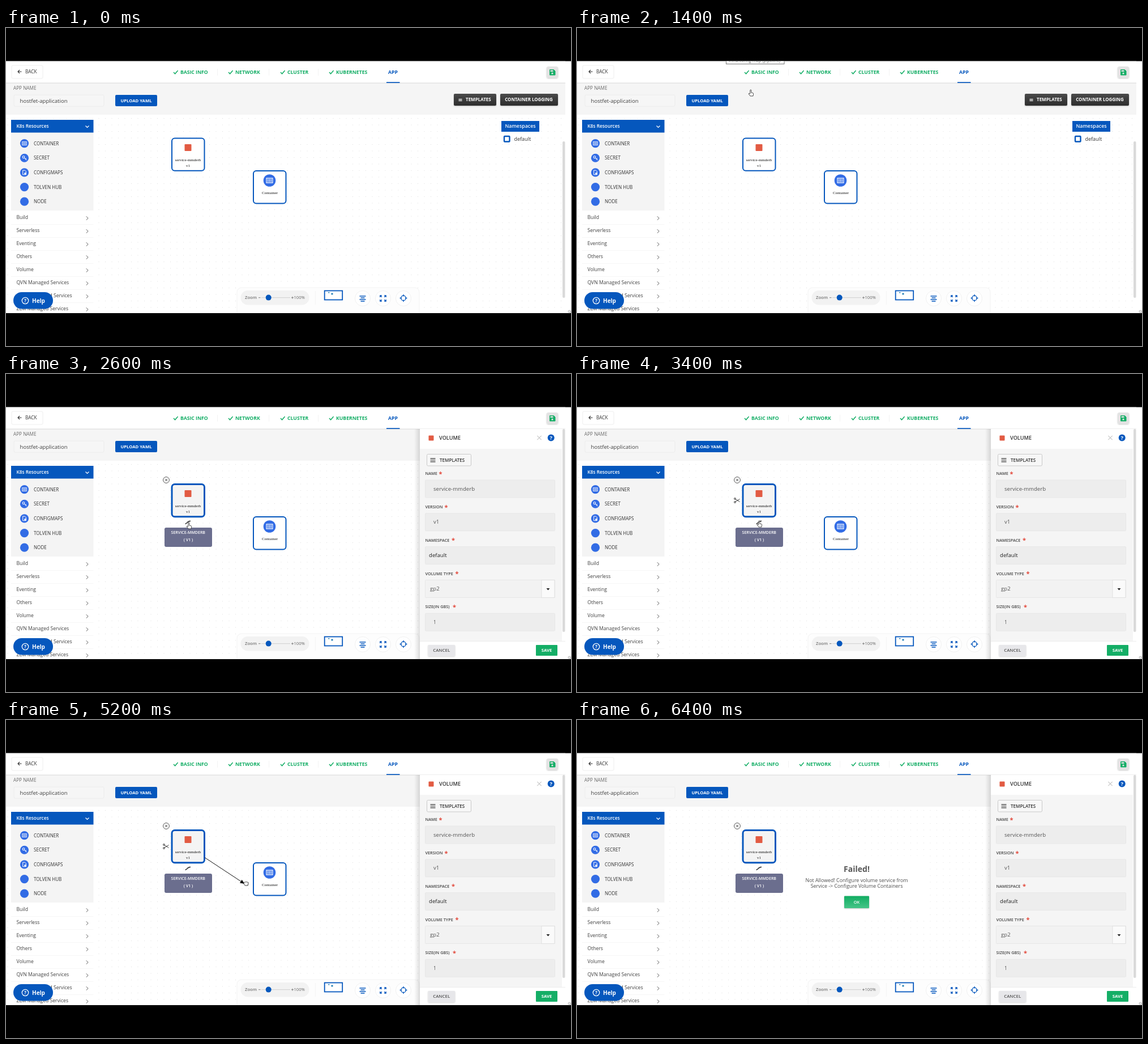
An HTML page for the animation above (6600 ms loop, 998 by 561 pixels).

```html
<!DOCTYPE html>
<html lang="en">
<head>
<meta charset="utf-8">
<title>App designer</title>
<style>
html, body { margin: 0; width: 100%; height: 100%; overflow: hidden; background: #000; }
svg { display: block; }
text { font-family: "Open Sans", "Noto Sans", sans-serif; white-space: pre; }
.serif { font-family: "Liberation Serif", serif; }
</style>
</head>
<body>
<svg id="stage" width="998" height="561" viewBox="0 0 998 561">
  <defs>
    <pattern id="dots" x="2.5" y="159" width="11.5" height="11.5" patternUnits="userSpaceOnUse">
      <rect width="1" height="1" fill="#dcdcdc"/>
    </pattern>
    <linearGradient id="dark" x2="0" y2="1"><stop stop-color="#4a4a4a"/><stop offset="1" stop-color="#2d2d2d"/></linearGradient>
    <linearGradient id="go" x2="0" y2="1"><stop stop-color="#12ad62"/><stop offset="1" stop-color="#45c487"/></linearGradient>
    <linearGradient id="shade"><stop stop-opacity="0"/><stop offset="1" stop-opacity=".13"/></linearGradient>
    <filter id="soft" x="-20%" y="-20%" width="140%" height="150%">
      <feDropShadow dx="0" dy="1" stdDeviation="1.3" flood-opacity=".22"/>
    </filter>
    <clipPath id="view"><rect y="58.5" width="998" height="444.5"/></clipPath>
  </defs>
  <g clip-path="url(#view)">
    <g id="page"></g>
    <g id="tip"></g>
    <g id="node"></g>
    <g id="picked"></g>
    <g id="scissors"></g>
    <g id="edge"><path id="line" stroke="#111" stroke-width="1"/><path id="head" fill="#111"/></g>
    <g id="panel"></g>
    <g id="dialog"></g>
    <g id="cursor"></g>
  </g>
</svg>
<script>
const BLUE = '#0557bd', GREEN = '#14ae66', INK = '#414141', RED = '#e25b43', KUBE = '#326ce5';
const $ = id => document.getElementById(id);

const rect = (x, y, w, h, fill, r = 0, extra = '') =>
  `<rect x="${x}" y="${y}" width="${w}" height="${h}" rx="${r}" fill="${fill}" ${extra}/>`;
const circle = (x, y, r, fill, extra = '') =>
  `<circle cx="${x}" cy="${y}" r="${r}" fill="${fill}" ${extra}/>`;
const path = (d, color = INK, w = 1, fill = 'none') =>
  `<path d="${d}" stroke="${color}" stroke-width="${w}" fill="${fill}"/>`;
const text = (x, y, s, size = 8, fill = INK, weight = 400, extra = '') =>
  `<text x="${x}" y="${y}" font-size="${size}" fill="${fill}" font-weight="${weight}" ${extra}>${s}</text>`;
const mid = (x, y, s, size, fill, weight, extra = '') =>
  text(x, y, s, size, fill, weight, 'text-anchor="middle" ' + extra);
const at = (x, y, s, k = 1) => `<g transform="translate(${x} ${y}) scale(${k})">${s}</g>`;
const bars = (x, y, w, gap, color, sw) =>
  path([-gap, 0, gap].map(d => `M${x} ${y + d}h${w}`).join(''), color, sw);
const cross = (x, y, r, color, w) =>
  path(`M${x - r} ${y - r}l${2 * r} ${2 * r}m0 ${-2 * r}l${-2 * r} ${2 * r}`, color, w);

const glyphs = {
  box: rect(-4, -3, 8, 6, 'none', 0, 'stroke="#fff" stroke-width=".9"') + path('M-2-2v4M0-2v4M2-2v4', '#fff', .9),
  key: circle(-1.6, -1.6, 2, 'none', 'stroke="#fff" stroke-width="1.1"') + path('M0 0l4 4M2 2l1.5-1.5', '#fff', 1.1),
  file: path('M-3-4h4l2 2v6h-6z', '#fff', 1) + circle(1.6, 2, 2, '#fff'),
  plain: ''
};
const badge = (x, y, glyph, k = 1) => at(x, y, circle(0, 0, 8, KUBE) + glyphs[glyph], k);

function topBar() {
  let s = rect(0, 58, 998, 445, '#fff') + rect(0, 58, 988, 2, '#eee');
  s += rect(0, 97, 988, 56, '#f5f5f5') + rect(0, 96.5, 988, 1.2, '#dedede');
  s += rect(10, 66, 55, 23, '#fff', 2, 'stroke="#eee" stroke-width="1"');
  s += path('M27.5 77h-6.5m3-3l-3 3l3 3', '#333', 1.1) + text(34, 80, 'BACK', 8.3, '#333');
  [[296, 'BASIC INFO'], [393, 'NETWORK'], [485, 'CLUSTER'], [571, 'KUBERNETES']].forEach(([x, name]) => {
    s += path(`M${x} 78l2.6 2.8l5-5.8`, GREEN, 1.5) + text(x + 12, 81, name, 8.7, GREEN, 700);
  });
  s += [373, 464, 551].map(x => rect(x, 72, 1, 12, '#f3f3f3')).join('');
  s += text(675, 80.5, 'APP', 8.7, BLUE, 700) + rect(672, 95.3, 23.5, 1.7, BLUE);
  s += rect(955, 68, 20, 20, '#e3e3e3', 3, 'filter="url(#soft)"');
  s += path('M960.5 73.5h7l2.5 2.5v7h-9.5z', GREEN, 1, GREEN) + rect(961.5, 74.5, 5, 2.4, '#e3e3e3') + circle(965, 80, 1.6, '#e3e3e3');

  s += text(13, 109, 'APP NAME', 8.2, '#6b6b6b');
  s += rect(14, 118, 159, 20, '#f6f6f6', 2, 'stroke="#ececec" stroke-width="1"') + text(24.5, 131.5, 'hostfet-application', 9.6);
  s += rect(193, 118, 74, 20, BLUE, 2) + mid(230, 130.7, 'UPLOAD YAML', 7.7, '#fff', 700);
  s += rect(791, 116, 75, 21, 'url(#dark)', 2, 'filter="url(#soft)"') + bars(799.5, 127, 6, 1.6, '#fff', .9);
  s += text(812, 129.3, 'TEMPLATES', 8, '#fff', 700);
  s += rect(873, 116, 102, 21, 'url(#dark)', 2, 'filter="url(#soft)"') + mid(923.5, 129.3, 'CONTAINER LOGGING', 7.9, '#fff', 700);
  return s;
}

function sideBar() {
  let s = rect(0, 154, 983, 349, 'url(#dots)') + rect(9, 162, 145.5, 341, '#fff') + rect(9, 184, 145.5, 138, '#f4f4f4');
  s += rect(9, 162, 145.5, 22.5, BLUE) + text(18.5, 176.3, 'K8s Resources', 8.3, '#fff', 600);
  s += path('M140.5 172.5l3 3l3-3', '#fff', 1.2);
  [['box', 'CONTAINER'], ['key', 'SECRET'], ['file', 'CONFIGMAPS'], ['plain', 'TOLVEN HUB'], ['plain', 'NODE']].forEach(([icon, name], i) => {
    const y = 203.6 + i * 25.65;
    s += badge(32.5, y, icon, .95) + text(49, y + 3, name, 8.1, '#333');
  });
  ['Build', 'Serverless', 'Eventing', 'Others', 'Volume', 'QVN Managed Services', '', 'ZLM Managed Services'].forEach((name, i) => {
    const y = 334.5 + i * 23;
    s += rect(9, y + 11.5, 145.5, .6, '#f1f1f1') + text(18.5, y + 2.9, name, 8.6) + path(`M141.8 ${y - 2.2}l3.2 3.2l-3.2 3.2`, '#555', 1);
  });
  s += text(116.5, 475.4, 'Managed Services', 8.6, INK, 400, 'text-anchor="end"');
  s += rect(13, 466, 70, 29.5, BLUE, 14.7) + circle(34, 481, 5.7, 'none', 'stroke="#fff" stroke-width="1.3"');
  s += mid(34, 484, '?', 8.5, '#fff', 700) + text(46, 484.5, 'Help', 10, '#fff', 700);
  return s;
}

function canvasArea() {
  let s = rect(875, 164, 67, 19, BLUE) + mid(908.5, 176.4, 'Namespaces', 8.8, '#fff', 600);
  s += rect(880, 191, 9.5, 9.5, '#fff', 1, `stroke="${BLUE}" stroke-width="2.4"`) + text(897.5, 198.6, 'default', 9, '#333');
  s += rect(983, 200, 4.5, 276, '#dadada', 2);
  s += rect(437, 252, 57.5, 57.5, '#fff', 5, `stroke="${BLUE}" stroke-width="2"`);
  s += badge(465.5, 269, 'box', 1.35) + mid(466, 293, 'Container', 7.1, '#111', 400, 'class="serif"');

  s += rect(408, 458, 322, 60, '#fdfdfd', 8, 'stroke="#f3f3f3" stroke-width="1"');
  s += rect(414.5, 463, 121, 25.5, '#f2f2f2', 12.5) + text(422, 478.3, 'Zoom', 7.7, '#777', 600);
  s += path('M446 475.7h3.5M504 475.7h4M506 473.7v4', '#777', .9) + rect(451, 475.2, 51, 1, '#cfcfcf');
  s += circle(463.7, 475.6, 5, BLUE) + text(508.5, 478.3, '100%', 7.6, '#666');
  s += rect(546, 464, .7, 24, '#efefef') + rect(562.7, 463.5, 31.5, 16, '#fff', 0, `stroke="${BLUE}" stroke-width="1.8"`);
  s += rect(569, 466, 2.5, 1.5, '#2b83b8') + rect(574.5, 467.5, 3, 3, '#2b83b8');
  s += [630, 666, 702].map(x => circle(x, 477, 13.5, '#fff', 'stroke="#f1f1f1" stroke-width="1"')).join('');
  s += path('M624.5 473h11M626.5 476h7M624.5 479h11M626.5 482h7', BLUE, 1.3);
  s += [0, 90, 180, 270].map(a => `<g transform="rotate(${a} 666 477)">${path('M663.8 474.8l-3-3m0 3.2v-3.2h3.2', BLUE, 1.3)}</g>`).join('');
  s += circle(702, 476.5, 4.3, 'none', `stroke="${BLUE}" stroke-width="1.3"`) + path('M702 470v3.5m0 6v3.5m-6.5-6.5h3.5m6 0h3.5', BLUE, 1.3);
  s += circle(995, 500, 1.9, 'none', 'stroke="#999" stroke-width=".8"') + path('M996.3 501.3l2 2', '#999', .8);
  return s;
}

const nodeBox = chosen =>
  rect(293, 194.5, 57.5, 57.2, chosen ? '#f4f4f4' : '#fff', 5, `stroke="${BLUE}" stroke-width="${chosen ? 3 : 2}"`) +
  rect(315.5, 205, 12, 12, RED, 1) +
  mid(321.5, 235.3, 'service-mmderb', 7, '#111', 400, 'class="serif"') + mid(321.5, 244.5, 'v1', 7, '#111', 400, 'class="serif"');

function pickedParts() {
  return circle(283, 187, 5.4, '#fff', 'stroke="#555" stroke-width="1"') + cross(283, 187, 2.1, '#555', 1) +
    path('M316.5 264.3c4 0 3-5 9.5-5', '#444', 1.7) +
    rect(280, 271, 84, 34, '#6b6e8e', 3) +
    mid(321.8, 281.8, 'SERVICE-MMDERB', 7, '#fff', 600) + mid(322, 295, '( V1 )', 7, '#fff', 600);
}

function panelParts() {
  let s = rect(721, 97, 10, 406, 'url(#shade)') + rect(731, 97, 257, 406, '#fff') + rect(731, 132, 251, 340, '#f5f5f5');
  s += rect(983, 97, 4.5, 358, '#dadada', 2);
  s += rect(746.5, 108.5, 9, 9, RED, 1) + text(765, 115.7, 'VOLUME', 9.2, '#333', 600);
  s += cross(942, 112.5, 3.7, '#c6c6c6', 1.1) + circle(962.7, 112.5, 6, BLUE) + mid(962.7, 116, '?', 9.5, '#fff', 700);
  s += rect(743.5, 141.5, 78, 20.5, '#f7f7f7', 2, 'stroke="#c9c9c9" stroke-width="1"') + bars(749.5, 152, 9, 2.8, '#333', 1.2);
  s += text(766, 154.8, 'TEMPLATES', 8.1, '#333', 600);
  const fields = [
    ['NAME', 'service-mmderb', 755, 767.5], ['VERSION', 'v1', 755, 777.5], ['NAMESPACE', 'default', 747, 790],
    ['VOLUME TYPE', 'gp2', 749, 796.5], ['SIZE(IN GBS)', '1', 755, 792]
  ];
  fields.forEach(([label, value, x, star], i) => {
    const y = 187 + i * 58.8, pick = i === 3;
    s += text(740.5, y - 8.8, label, 7.3, '#444', 600) + mid(star, y - 7.2, '*', 11, '#e3493c', 700);
    s += rect(740.5, y, 229, 31, pick ? '#f2f2f2' : '#ededed', 1, 'stroke="#e5e5e5" stroke-width=".8"');
    s += text(x, y + 18.6, value, i === 4 ? 8.5 : 9.6, i === 2 ? '#222' : '#555');
  });
  s += rect(946, 363.5, 23, 31, '#fafafa', 0, 'stroke="#dcdcdc" stroke-width=".8"') + path('M954.5 378h6l-3 3.4z', '#222', 0, '#222');
  s += rect(731, 471.5, 257, 32, '#fff') + rect(731, 471, 257, .8, '#e9e9e9');
  s += rect(745.5, 478, 47.5, 19.5, '#e7e7ea', 1, 'filter="url(#soft)"') + mid(769.2, 490, 'CANCEL', 7.9, '#555', 600);
  s += rect(936, 478, 38, 19, GREEN, 1) + mid(955, 490, 'SAVE', 7.7, '#fff', 700);
  return s;
}

function dialogParts() {
  return rect(371, 240, 246, 105, '#fff', 2) + mid(494, 268.3, 'Failed!', 14, '#575757', 700) +
    mid(494, 285.6, 'Not Allowed! Configure volume service from', 8.85, '#4d4d4d') +
    mid(494, 295.9, 'Service -&gt; Configure Volume Containers', 8.85, '#4d4d4d') +
    rect(472, 310.5, 44, 21.5, 'url(#go)', 1, 'filter="url(#soft)"') + mid(494, 323.5, 'OK', 7.3, '#fff', 600);
}

const pointers = {
  hand: path('M-1.2 1v-6q0-1 1-1t1 1v4l3 .7q1 .3.8 1.5l-.6 3.8h-5l-3-4q.3-1.4 1.8-.2z', '#222', .8, '#fff'),
  grab: path('M-3.5-1q1-2 2-.8q1-1.4 2.2-.2q1.4-1 2 .3q1.6-.3 1.3 1.5l-.8 4.2h-5l-2.2-3z', '#222', .9, '#fff'),
  move: path('M-4 0h8M0-4v8', '#fff', 2.8) + path('M-4 0h8M0-4v8M-1.4-3.2l1.4-1.6l1.4 1.6M-1.4 3.2l1.4 1.6l1.4-1.6M-3.2-1.4l-1.6 1.4l1.6 1.4M3.2-1.4l1.6 1.4l-1.6 1.4', '#222', .8)
};

$('page').innerHTML = topBar() + sideBar() + canvasArea();
$('tip').innerHTML = rect(263.5, 50, 102.5, 13.5, '#fff', 0, 'stroke="#777" stroke-width="1"') + text(268, 59.5, 'infra/config-map (pipeline)', 7.4, '#555');
$('picked').innerHTML = pickedParts();
$('scissors').innerHTML = path('M279.5 220.5l8 5M279.5 225.5l8-5', '#444', 1) +
  [220, 226].map(y => circle(279, y, 1.4, 'none', 'stroke="#444" stroke-width="1"')).join('');
$('panel').innerHTML = panelParts();
$('dialog').innerHTML = dialogParts();

// time, pointer, x, y: each pose holds until the next
const steps = [
  [0], [1400, 'hand', 307, 115], [1600, 'hand', 310, 153], [1800, 'hand', 317, 186], [2000, 'move', 325, 225],
  [2400, 'move', 326, 234], [2600, 'hand', 323, 268], [3400, 'hand', 322, 265], [4200, 'grab', 332, 264],
  [4400, 'grab', 354, 266], [4600, 'grab', 379, 270], [4800, 'grab', 396, 276], [5000, 'grab', 412, 283],
  [5200, 'grab', 424, 288], [5400, 'grab', 432, 291], [5600, 'move', 437, 293], [5800, 'move', 438, 293], [6200]
];
const LOOP = 6600;
const show = (id, on) => $(id).setAttribute('visibility', on ? 'visible' : 'hidden');

function drawEdge(x, y) {
  const cx = 321.7, cy = 223.3, dx = x - cx, dy = y - cy, len = Math.hypot(dx, dy);
  const k = 29.5 / Math.max(Math.abs(dx), Math.abs(dy)), ux = dx / len, uy = dy / len;
  const bx = x - ux * 8, by = y - uy * 8;
  $('line').setAttribute('d', `M${cx + dx * k} ${cy + dy * k}L${bx} ${by}`);
  $('head').setAttribute('d', `M${x} ${y}L${bx - uy * 3.4} ${by + ux * 3.4}L${bx + uy * 3.4} ${by - ux * 3.4}Z`);
}

let last = null, wasPicked = null;
function render(now) {
  const t = now % LOOP, within = (a, b) => t >= a && t < b;
  const step = steps.filter(s => s[0] <= t).pop();
  const [, kind, x, y] = step, picked = t >= 2600, dragging = within(4200, 6200);
  if (step !== last) {
    $('cursor').innerHTML = kind ? at(x, y, pointers[kind]) : '';
    if (dragging) drawEdge(x - 2.5, y + 1);
    last = step;
  }
  if (picked !== wasPicked) {
    $('node').innerHTML = nodeBox(picked);
    wasPicked = picked;
  }
  show('tip', within(600, 1600));
  show('picked', picked);
  show('panel', picked);
  show('scissors', within(2800, 6200));
  show('edge', dragging);
  show('dialog', t >= 6200);
  requestAnimationFrame(() => render(performance.now()));
}
render(performance.now());
</script>
</body>
</html>
```
